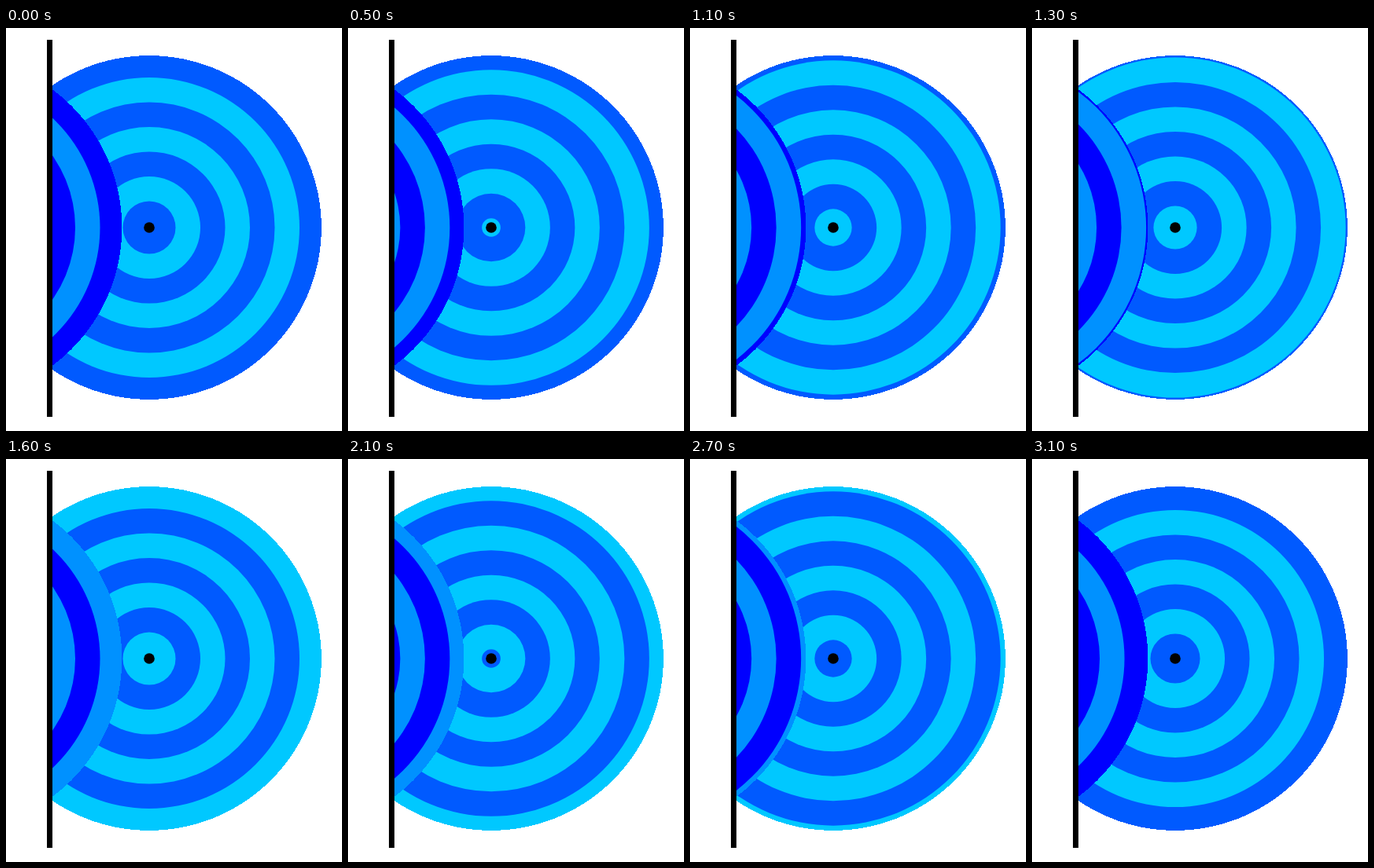
These frames come from a looping animation (427 px wide and 513 px high, 3200 ms). An HTML page:

```html
<!DOCTYPE html>
<html lang="en">
<head>
<meta charset="utf-8">
<title>Wave reflection</title>
<style>
  html, body { margin: 0; width: 100%; height: 100%; overflow: hidden; background: #fff; }
  svg { display: block; width: 100%; height: 100%; }
</style>
</head>
<body>
<svg viewBox="0 0 427 513">
  <clipPath id="room"><rect x="59" y="0" width="368" height="513"/></clipPath>
  <g clip-path="url(#room)">
    <g id="direct" transform="translate(182 254)"></g>
    <g id="reflected" transform="translate(-71.5 254)"></g>
  </g>
  <rect x="51.5" y="15" width="7.5" height="479.5" shape-rendering="crispEdges"/>
  <circle cx="182" cy="254" r="6.8"/>
</svg>
<script>
  const LOOP = 3200, STEP = 100;
  const REACH = 218.9, BAND = 31.5, START = 33.5;
  const FIRST = 6, LAST = -2;

  // Stacked discs, largest first, in alternating colours
  function makeWave(id, dark, light) {
    const group = document.getElementById(id);
    const discs = [];
    for (let k = FIRST; k >= LAST; k--) {
      const disc = document.createElementNS(group.namespaceURI, 'circle');
      disc.setAttribute('fill', k % 2 ? light : dark);
      group.append(disc);
      discs.push({ disc, k });
    }
    return discs;
  }

  const discs = [
    ...makeWave('direct', '#005aff', '#00c8ff'),
    ...makeWave('reflected', '#0000ff', '#0091ff')
  ];

  function draw(now) {
    const time = Math.floor((now % LOOP) / STEP) * STEP;
    const shift = 2 * BAND * time / LOOP;
    for (const { disc, k } of discs) {
      const radius = START + BAND * k + shift;
      disc.setAttribute('r', Math.max(0, Math.min(REACH, radius)));
      disc.setAttribute('shape-rendering', radius >= REACH ? 'crispEdges' : 'auto');
    }
    requestAnimationFrame(draw);
  }
  draw(0);
</script>
</body>
</html>
```
